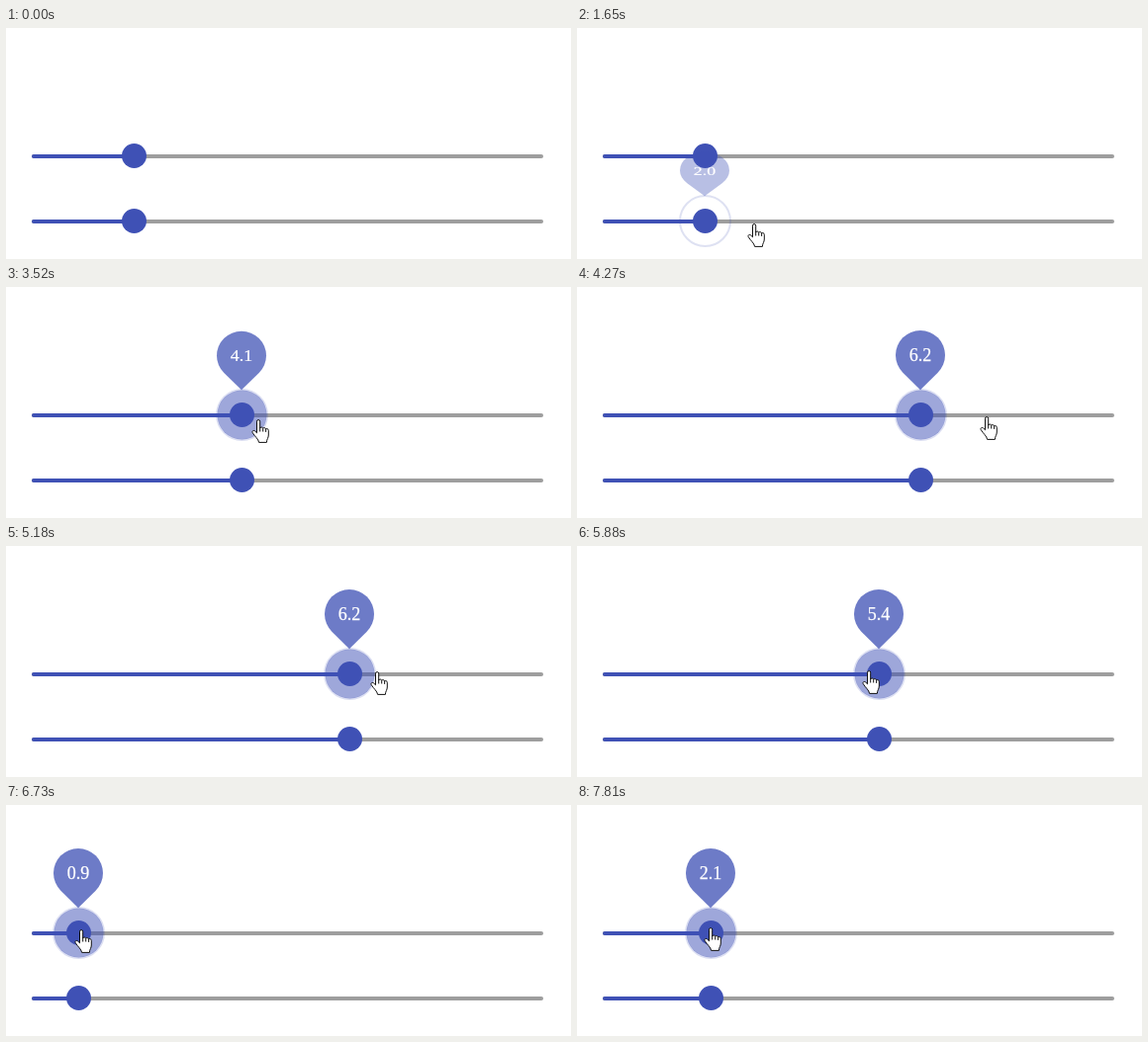
An HTML page for the animation above (8 s loop, 571 by 234 pixels).

```html
<!DOCTYPE html>
<html lang="en">
<head>
<meta charset="utf-8">
<title>Linked sliders</title>
<style>
  html, body { margin: 0; width: 100%; height: 100%; overflow: hidden; background: #fff; }
  svg { display: block; width: 571px; height: 234px; }
  .rail, .fill { stroke-width: 4; stroke-linecap: round; }
  .rail { stroke: #9e9e9e; }
  .fill { stroke: #3f51b5; }
  .thumb, .halo, .drop { fill: #3f51b5; }
  .drop { fill-opacity: .755; }
  .ring { fill: none; stroke: #3f51b5; stroke-width: 2; }
  .hand { fill: #fff; stroke: #111; stroke-linejoin: round; }
  text {
    font: 18px "Liberation Serif", "Times New Roman", serif;
    fill: #fff; stroke: #fff; stroke-width: .25; text-anchor: middle;
  }
</style>
</head>
<body>
<svg id="stage" viewBox="0 0 571 234"></svg>
<script>
const LOOP = 8000, LEFT = 26, UNIT = 51.7;
const stage = document.getElementById('stage');

// Pointer moves: start, end, dx, dy, easing power (below 1 slows down, above 1 speeds up)
const moves = [
  [600, 1380, 5, -34, .4],
  [1400, 1650, 42, 0, 1],
  [1650, 2570, 64, -64, .53],
  [3280, 3580, 20, -3, 1.6],
  [3590, 4420, 187, -2, 1],
  [4700, 5480, -90, -5, .43],
  [5540, 6730, -282, 0, 1.2],
  [6905, 7810, 59, -2, 1]
];

const clamp = k => Math.min(1, Math.max(0, k));
const ramp = (t, start, end, power = 1) => clamp((t - start) / (end - start)) ** power;

const showTop = t => ramp(t, 3200, 3530);
const showLow = t => ramp(t, 980, 1380) - ramp(t, 1495, 1795);

// A click glides smoothly; dragging snaps to tenths
function valueAt(t) {
  const glide = 2.1 * ramp(t, 2780, 3180, .4);
  const drag = 2.1 * ramp(t, 3590, 4020) + .2 * ramp(t, 5510, 5540)
    - 5.5 * ramp(t, 5540, 6730, 1.36) + 1.2 * ramp(t, 6905, 7700);
  return 2 + glide + Math.round(drag * 10) / 10;
}

function pointerAt(t) {
  let x = 123, y = 234;
  for (const [start, end, dx, dy, power] of moves) {
    const k = ramp(t, start, end, power);
    x += dx * k;
    y += dy * k;
  }
  return [Math.round(x), Math.round(y)];
}

function set(el, attrs) {
  for (const name in attrs) el.setAttribute(name, attrs[name]);
}

function add(tag, attrs = {}, parent = stage) {
  const el = document.createElementNS('http://www.w3.org/2000/svg', tag);
  set(el, attrs);
  parent.append(el);
  return el;
}

function makeSlider(y, show) {
  const line = { x1: 28, x2: 541, y1: y + .5, y2: y + .5 };
  add('line', { class: 'rail', ...line });
  const fill = add('line', { class: 'fill', ...line });
  const knob = add('g');
  const halo = add('circle', { class: 'halo', r: 25 }, knob);
  const ring = add('circle', { class: 'ring', r: 25.5 }, knob);
  add('circle', { class: 'thumb', r: 12.5 }, knob);
  return { y, show, fill, knob, halo, ring };
}

// The balloon's origin is its tip, so it can unfold upwards
function makeBalloon(slider) {
  slider.balloon = add('g');
  add('path', {
    class: 'drop',
    transform: 'translate(0 -35.4) rotate(45)',
    d: 'M0-25A25 25 0 0 1 25 0V25H0A25 25 0 0 1 0-25Z'
  }, slider.balloon);
  slider.label = add('text', { y: -29.4 }, slider.balloon);
}

const sliders = [makeSlider(129.5, showTop), makeSlider(195.5, showLow)];
sliders.forEach(makeBalloon);

const hand = add('path', {
  class: 'hand',
  d: 'M5.5 13.8V2.2a1.6 1.6 0 0 1 3.2 0V9c.3-1.4 2.9-1.3 3 .3c.5-1.2 2.8-.9 2.9.8' +
     'c.6-1 2.7-.6 2.7 1.2V16c0 3-1.9 4.2-1.9 7.4H7.6C7.2 20 3.5 17.5 1.2 13.6' +
     'c-.9-1.9 1.2-2.8 2.5-1.6zM8.7 8.5v4M11.7 9.3v3.2M14.6 10.1v2.8'
});

function draw(t) {
  const value = valueAt(t);
  const x = Math.round(LEFT + value * UNIT);

  for (const s of sliders) {
    const p = s.show(t);
    set(s.fill, { x2: x });
    set(s.knob, { transform: `translate(${x + .5} ${s.y})` });
    set(s.halo, { opacity: .5 * clamp(3 * p - 1.5) });
    set(s.ring, { opacity: .18 * clamp(2 * p) });
    set(s.balloon, {
      transform: `translate(${x} ${s.y - 25.1}) scale(1 ${.5 + p / 2})`,
      opacity: p
    });
    s.label.textContent = value.toFixed(1);
  }

  const [px, py] = pointerAt(t);
  set(hand, { transform: `translate(${px} ${py})`, opacity: t < 600 ? 0 : 1 });
}

const start = performance.now();
function tick() {
  draw((performance.now() - start) % LOOP);
  requestAnimationFrame(tick);
}
tick();
</script>
</body>
</html>
```
